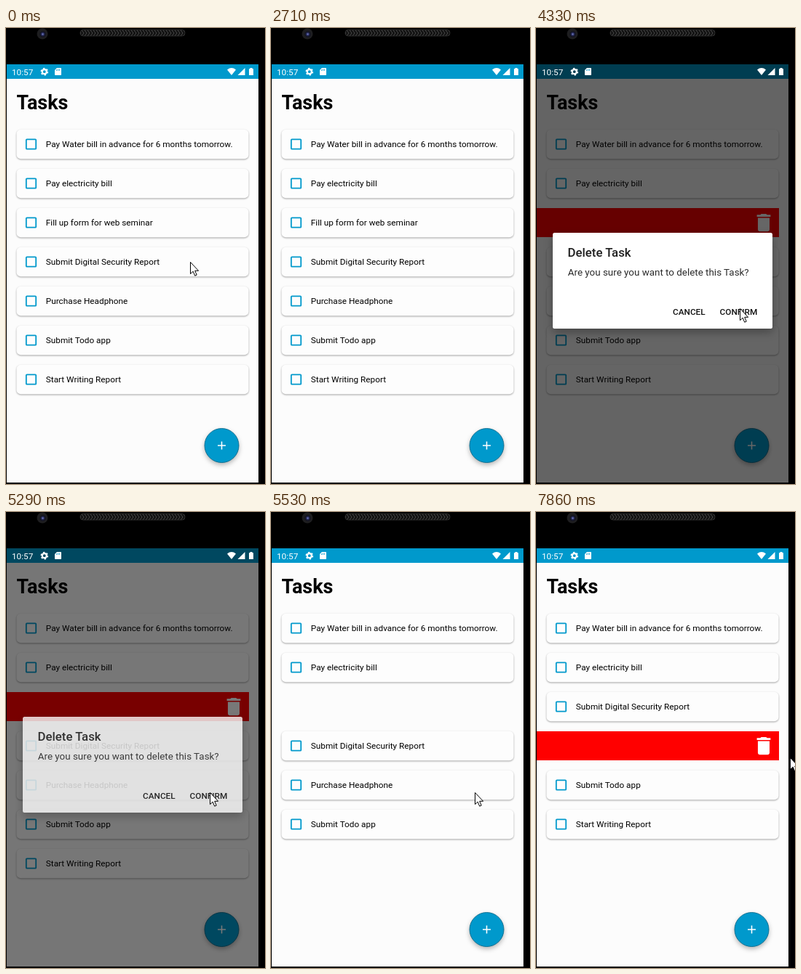
These frames come from a looping animation (356x628 px, 8 s). An HTML page:

```html
<!DOCTYPE html>
<html lang="en">
<head>
<meta charset="utf-8">
<title>Tasks</title>
<style>
  html, body { margin: 0; width: 100%; height: 100%; overflow: hidden; background: #000; }
  svg { display: block; width: 356px; height: 628px; }
  text { font-family: Roboto, Arial, sans-serif; font-size: 11.79px; white-space: pre; }
  .heading { font-size: 26.9px; font-weight: 700; }
  .title { font-size: 16.84px; font-weight: 500; fill: #1f1f1f; }
  .message { font-size: 13.4px; fill: #2b2b2b; }
  .button { font-weight: 500; fill: #111; }
  .card { filter: drop-shadow(0 1px 1.3px rgba(0, 0, 0, .36)); }
  .fab { filter: drop-shadow(0 3px 3px rgba(0, 0, 0, .28)); }
  .dialog { filter: drop-shadow(0 5px 6px rgba(0, 0, 0, .3)); }
</style>
</head>
<body>
<svg viewBox="0 0 356 628">
  <defs>
    <clipPath id="screen"><rect x="1" y="50" width="346" height="576"/></clipPath>
    <pattern id="mesh" width="4" height="8" patternUnits="userSpaceOnUse" y="3">
      <path d="M0 0L3 4L0 8" fill="none" stroke="#4a4a4a"/>
    </pattern>
    <radialGradient id="lens">
      <stop offset="0" stop-color="#7d86c8"/>
      <stop offset=".35" stop-color="#2c3167"/>
      <stop offset=".7" stop-color="#11121f"/>
      <stop offset="1" stop-color="#1d1d20"/>
    </radialGradient>
  </defs>

  <rect width="356" height="628"/>
  <circle cx="50" cy="8" r="7.5" fill="#1e1e20"/>
  <circle cx="50.5" cy="8.5" r="4.8" fill="url(#lens)"/>
  <rect x="102" y="2.5" width="144" height="8.5" rx="4" fill="#111"/>
  <rect x="102" y="2.5" width="144" height="8.5" rx="4" fill="url(#mesh)" stroke="#333" stroke-width=".8"/>

  <g clip-path="url(#screen)">
    <rect x="1" y="50" width="346" height="576" fill="#fcfcfc"/>
    <rect x="1" y="50" width="346" height="20" fill="#09c"/>
    <text class="heading" x="14.5" y="112">Tasks</text>
    <g id="rows"></g>
    <g class="fab">
      <circle cx="296.5" cy="575" r="23.5" fill="#09c" stroke="#04698c" stroke-width=".9"/>
    </g>
    <path d="M291 575h11M296.5 569.5v11" stroke="#fff" stroke-width="1.6"/>
    <rect id="scrim" x="1" y="50" width="346" height="576"/>

    <g fill="#fff">
      <text x="8" y="64.8">10:57</text>
      <circle cx="52.8" cy="60.2" r="3" fill="none" stroke="#fff" stroke-width="2.2"/>
      <circle cx="52.8" cy="60.2" r="4.6" fill="none" stroke="#fff" stroke-width="1.5" stroke-dasharray="2.4 2.417"/>
      <path d="M70 55h5.2q.8 0 .8.8v8.4q0 .8-.8.8h-7.4q-.8 0-.8-.8V58z"/>
      <path d="M69.5 57v2M71.5 56.4v2.6M73.5 56.4v2.6" stroke="#09c" stroke-width=".8"/>
      <path d="M304 57.4Q310 52.6 316 57.4L310 65z"/>
      <path d="M328.5 55v10h-10z"/>
      <path d="M335.5 55h3v1.2h1.5v8.8h-6v-8.8h1.5z"/>
    </g>

    <g id="dialog">
      <rect class="dialog" x="23" y="282" width="302" height="132" rx="2.5" fill="#fff"/>
      <text class="title" x="43.5" y="315">Delete Task</text>
      <text class="message" x="43.8" y="341">Are you sure you want to delete this Task?</text>
      <text class="button" x="188" y="395">CANCEL</text>
      <text class="button" x="252.6" y="395">CONFIRM</text>
    </g>
  </g>

  <path id="cursor" d="M.5.5V16.6L4.2 13.2L6.7 19.2L9.2 18.1L6.7 12.3H11.6z"
        fill="#fff" stroke="#000" stroke-width="1" stroke-linejoin="round"/>
</svg>

<script>
const LOOP = 8000, FIRST_ROW = 160, PITCH = 54, CARD_RIGHT = 334;
const RED_OVERLAP = 7, GONE = -346;

const TASKS = [
  'Pay Water bill in advance for 6 months tomorrow.',
  'Pay electricity bill',
  'Fill up form for web seminar',
  'Submit Digital Security Report',
  'Purchase Headphone',
  'Submit Todo app',
  'Start Writing Report'
];
const DELETED = 2, SWIPED = 4, LAST = 6;

// Each table holds [start ms, values...]; a value stays until the next entry.
// A cursor entry without a place hides the pointer.
const CURSOR = [
  [0, 253, 322], [150], [1520, 253, 322], [1640, 258, 300], [1760, 256, 277],
  [1910, 253, 274], [2030, 256, 271], [2320, 208, 271], [2470, 120, 271],
  [2590, 20, 271], [2710], [2960, 153, 265], [3370, 278, 263], [3520, 295, 258],
  [3640, 311, 255], [3790, 311, 300], [3910, 305, 350], [4030, 301, 388],
  [4180, 283, 387], [4330, 280, 386], [6360, 276, 345], [6490, 265, 308],
  [6650, 272, 307], [6820, 270, 321], [7070, 200, 321], [7190, 110, 321],
  [7310], [7860, 349, 338]
];
const FADE = [ // scrim, dialog
  [0, 0, 0], [3250, .28, .65], [3370, .6, 1], [5290, .53, .78], [5410, .22, 0], [5530, 0, 0]
];
const FIRST_SWIPE = [[0, 0], [2840, -180], [2960, GONE]];
const SECOND_SWIPE = [[0, 0], [7310, -80], [7430, -207], [7580, -254], [7730, GONE]];
const LIST = [ // shift of the lower rows, opacity of the last row
  [0, 0, 1], [5530, 0, 0], [5650, -27, .5], [5770, -PITCH, 1]
];
const REMOVED_AT = 5530;

const $ = id => document.getElementById(id);
const at = (table, t) => table.findLast(step => step[0] <= t).slice(1);
const move = (el, x, y) => el.setAttribute('transform', `translate(${x} ${y})`);
const fade = (el, value) => el.setAttribute('opacity', value);

function addRow(label) {
  const row = document.createElementNS('http://www.w3.org/2000/svg', 'g');
  // Drawn around y = 0, the middle of the row.
  row.innerHTML = `
    <g>
      <rect class="card" x="14.5" y="-20.3" width="319" height="40.6" rx="6" fill="#fdfdfd"/>
      <rect x="27.8" y="-6.7" width="13.4" height="13.4" rx="1" fill="none" stroke="#09c" stroke-width="1.8"/>
      <text x="54.8" y="4.4">${label}</text>
    </g>
    <g>
      <rect y="-20" height="40" fill="#f00"/>
      <path transform="translate(296.9 -16) scale(1.34)" fill="#fff"
        d="M6 19c0 1.1.9 2 2 2h8c1.1 0 2-.9 2-2V7H6v12zM19 4h-3.5l-1-1h-5l-1 1H5v2h14V4z"/>
    </g>`;
  $('rows').append(row);
  const [card, back] = row.children;
  return { row, card, back, red: back.firstElementChild };
}

const rows = TASKS.map(addRow);

function swipe({ card, back, red }, dx) {
  const left = Math.max(1, CARD_RIGHT + dx - RED_OVERLAP);
  move(card, dx, 0);
  fade(back, dx ? 1 : 0);
  red.setAttribute('x', left);
  red.setAttribute('width', CARD_RIGHT - left);
}

function draw(t) {
  const [shift, lastOpacity] = at(LIST, t);
  rows.forEach((item, i) => {
    move(item.row, 0, FIRST_ROW + i * PITCH + (i > DELETED ? shift : 0));
    const dx = i === DELETED ? at(FIRST_SWIPE, t) : i === SWIPED ? at(SECOND_SWIPE, t) : [0];
    swipe(item, dx[0]);
  });
  fade(rows[DELETED].row, t < REMOVED_AT ? 1 : 0);
  fade(rows[LAST].row, lastOpacity);

  const [scrim, dialog] = at(FADE, t);
  fade($('scrim'), scrim);
  fade($('dialog'), dialog);

  const [x, y] = at(CURSOR, t);
  fade($('cursor'), x === undefined ? 0 : 1);
  if (x !== undefined) move($('cursor'), x, y);
}

const start = performance.now();
function tick() {
  draw((performance.now() - start) % LOOP);
  requestAnimationFrame(tick);
}
tick();
</script>
</body>
</html>
```
